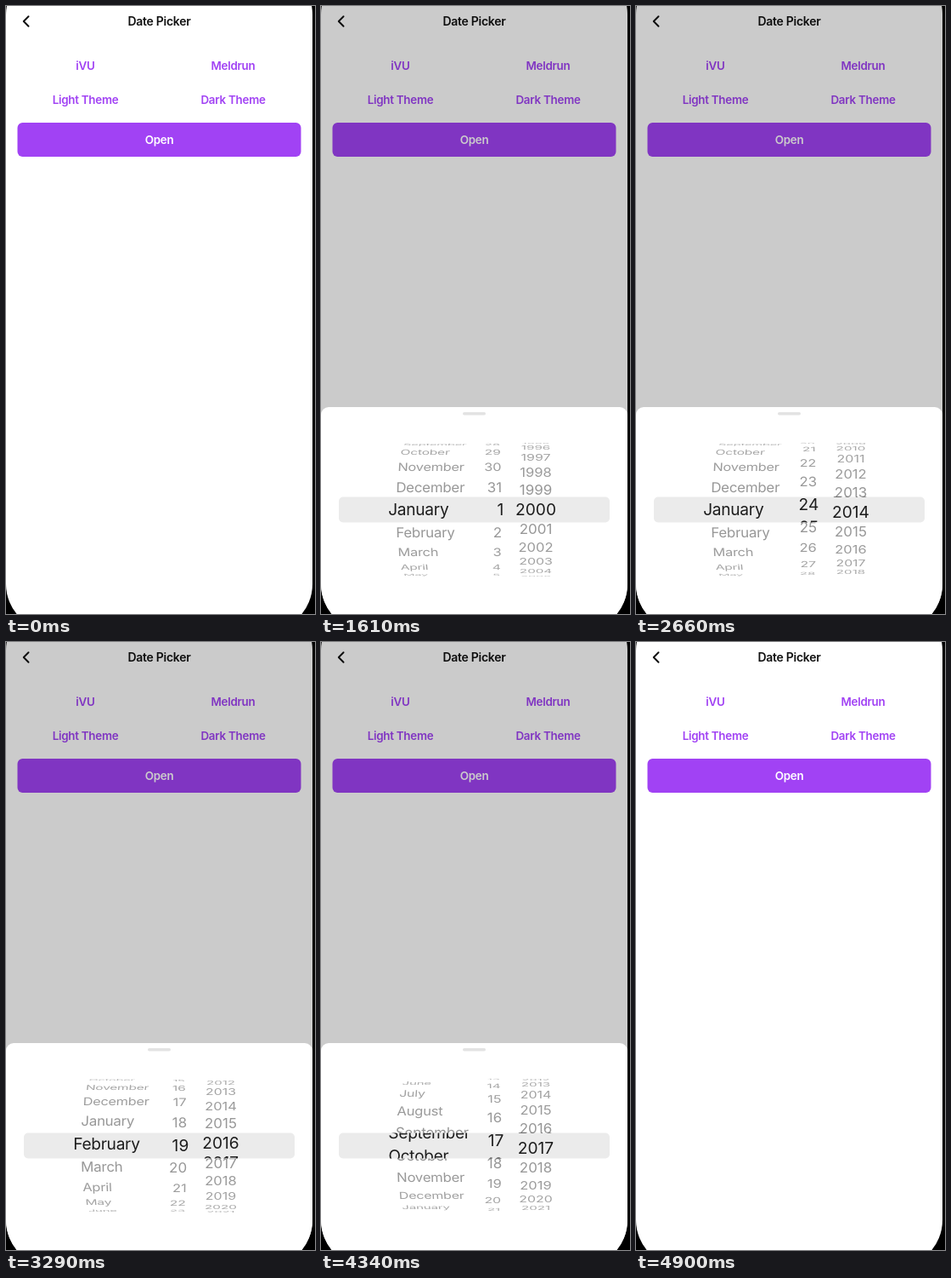
Recreate the animation shown at these times as an HTML page with a canvas. Size 364 by 714 pixels, loop 5.95 s.

```html
<!DOCTYPE html>
<html lang="en">
<head>
<meta charset="utf-8">
<title>Date Picker</title>
<style>
  html, body { margin: 0; height: 100%; overflow: hidden; background: #000; }
  canvas { display: block; width: 364px; height: 714px; }
</style>
</head>
<body>
<canvas id="stage"></canvas>
<script>
const W = 364, H = 714, LOOP = 5950, STEP = 70;
const OPEN_AT = 770, CLOSE_AT = 4650, CLOSED_AT = 4900;
const PURPLE = '#a142f4';
const FONT = 'Inter, "Open Sans", sans-serif';
const MONTHS = ['January', 'February', 'March', 'April', 'May', 'June', 'July',
  'August', 'September', 'October', 'November', 'December'];

const canvas = document.getElementById('stage');
const ratio = window.devicePixelRatio || 1;
canvas.width = W * ratio;
canvas.height = H * ratio;
const ctx = canvas.getContext('2d');
ctx.scale(ratio, ratio);

const clamp = x => Math.min(1, Math.max(0, x));
const mod = (a, n) => ((a % n) + n) % n;
const easeInOut = x => x < .5 ? 2 * x * x : 1 - 2 * (1 - x) ** 2;

// A finger drag that speeds up evenly, then a coast with exponential slowdown.
function fling(t, start, distance) {
  const drag = 280, tau = 495, speed = distance / (tau + drag / 2);
  const s = t - start;
  if (s <= 0) return 0;
  if (s < drag) return speed * s * s / (2 * drag);
  return distance - speed * tau * Math.exp((drag - s) / tau);
}

// x: anchor of the labels, eye: vanishing point of the column
const columns = [
  { x: 87.5, eye: 157, align: 'left', angle: 20, spacing: -.26,
    label: i => MONTHS[mod(i, 12)], at: t => fling(t, 3089, 9.62) },
  { x: 213.3, eye: 197, align: 'right', angle: 20, spacing: 0,
    label: i => mod(i, 31) + 1, at: t => fling(t, 2143, -15) },
  { x: 253, eye: 253, align: 'center', angle: 17.2, spacing: 0,
    label: i => 2000 + i, at: t => fling(t, 1662, 17) }
];

function box(x, y, w, h, r, color) {
  ctx.beginPath();
  ctx.roundRect(x, y, w, h, r);
  ctx.fillStyle = color;
  ctx.fill();
}

function text(str, x, y, color, size = 13.4) {
  ctx.font = `600 ${size}px ${FONT}`;
  ctx.letterSpacing = -.02 * size + 'px';
  ctx.textAlign = 'center';
  ctx.fillStyle = color;
  ctx.fillText(str, x, y + size * .36);
}

function drawPage(t) {
  box(0, 0, W, H, 0, '#fff');
  ctx.strokeStyle = '#111';
  ctx.lineWidth = 2;
  ctx.lineCap = ctx.lineJoin = 'round';
  ctx.stroke(new Path2D('M26.5 12.3 L20.8 18 L26.5 23.7'));
  text('Date Picker', 180.5, 18, '#111', 14);
  text('iVU', 93.5, 70, PURPLE);
  text('Meldrun', 267.5, 70, PURPLE);
  text('Light Theme', 93.5, 110, PURPLE);
  text('Dark Theme', 267.5, 110, PURPLE);

  // The button fades back in after the press.
  ctx.globalAlpha = t < OPEN_AT ? 1 : .2 + .8 * easeInOut(clamp((t - 678) / 250));
  box(13.5, 137, 334, 40, 6, PURPLE);
  text('Open', 180.5, 157, '#fff');
  ctx.globalAlpha = 1;
}

function drawColumn(col, t, mid, zoom, color) {
  const radius = 78, depth = 400, size = 17.1;
  const pos = col.at(t), near = Math.round(pos);
  ctx.font = `400 ${size}px ${FONT}`;
  ctx.letterSpacing = col.spacing + 'px';
  ctx.textAlign = col.align;
  ctx.fillStyle = color;
  for (let i = near - 5; i <= near + 5; i++) {
    const a = (i - pos) * col.angle * Math.PI / 180;
    if (Math.abs(a) > 1.53) continue;
    const scale = zoom * depth / (depth + radius * (1 - Math.cos(a)));
    const dx = (col.x - col.eye) * scale;
    const lean = -dx * .4 * scale * Math.sin(a) / depth;
    ctx.save();
    ctx.transform(scale, 0, lean, zoom * Math.cos(a), col.eye + dx, mid + radius * Math.sin(a));
    ctx.globalAlpha = zoom > 1 ? 1 : .7 + .3 * Math.cos(a);
    ctx.fillText(col.label(i), 0, size * .36);
    ctx.restore();
  }
}

function drawWheels(t, mid) {
  const top = mid - 15, bottom = mid + 15;
  box(21, top, 319, 30, 5, '#ebebeb');

  const layer = (zoom, color, ...areas) => {
    ctx.save();
    ctx.beginPath();
    for (const [y, h] of areas) ctx.rect(0, y, W, h);
    ctx.clip();
    for (const col of columns) drawColumn(col, t, mid, zoom, color);
    ctx.restore();
  };
  layer(1, '#959595', [top - 90, 90], [bottom, 90]);
  layer(1.12, '#1c1c1c', [top, 30]);
}

function sheetOpenness(t) {
  if (t < OPEN_AT || t >= CLOSED_AT) return 0;
  if (t > CLOSE_AT) return 2 ** ((CLOSE_AT - t) / 25);
  return 1 - 2 ** ((694 - t) / 25);
}

function draw(t) {
  box(0, 0, W, H, 0, '#000');
  ctx.save();
  ctx.beginPath();
  ctx.roundRect(0, -45, 361, 779, 55);
  ctx.clip();
  drawPage(t);
  const open = sheetOpenness(t);
  if (open > 0) {
    box(0, 0, W, H, 0, `rgba(0,0,0,${.205 * clamp(open * 1.14)})`);
    const top = H - 243 * open;
    box(0, top, 361, 300, 9, '#fff');
    box(167, top + 6, 27, 3.5, 1.75, '#e3e3e3');
    drawWheels(t, top + 120.5);
  }
  ctx.restore();
}

const began = performance.now();
function tick() {
  let t = Math.floor((performance.now() - began) % LOOP / STEP) * STEP;
  if (t > 3780 && t < 3990) t = 3780; // the picture stalls here
  draw(t);
  requestAnimationFrame(tick);
}
tick();
</script>
</body>
</html>
```
